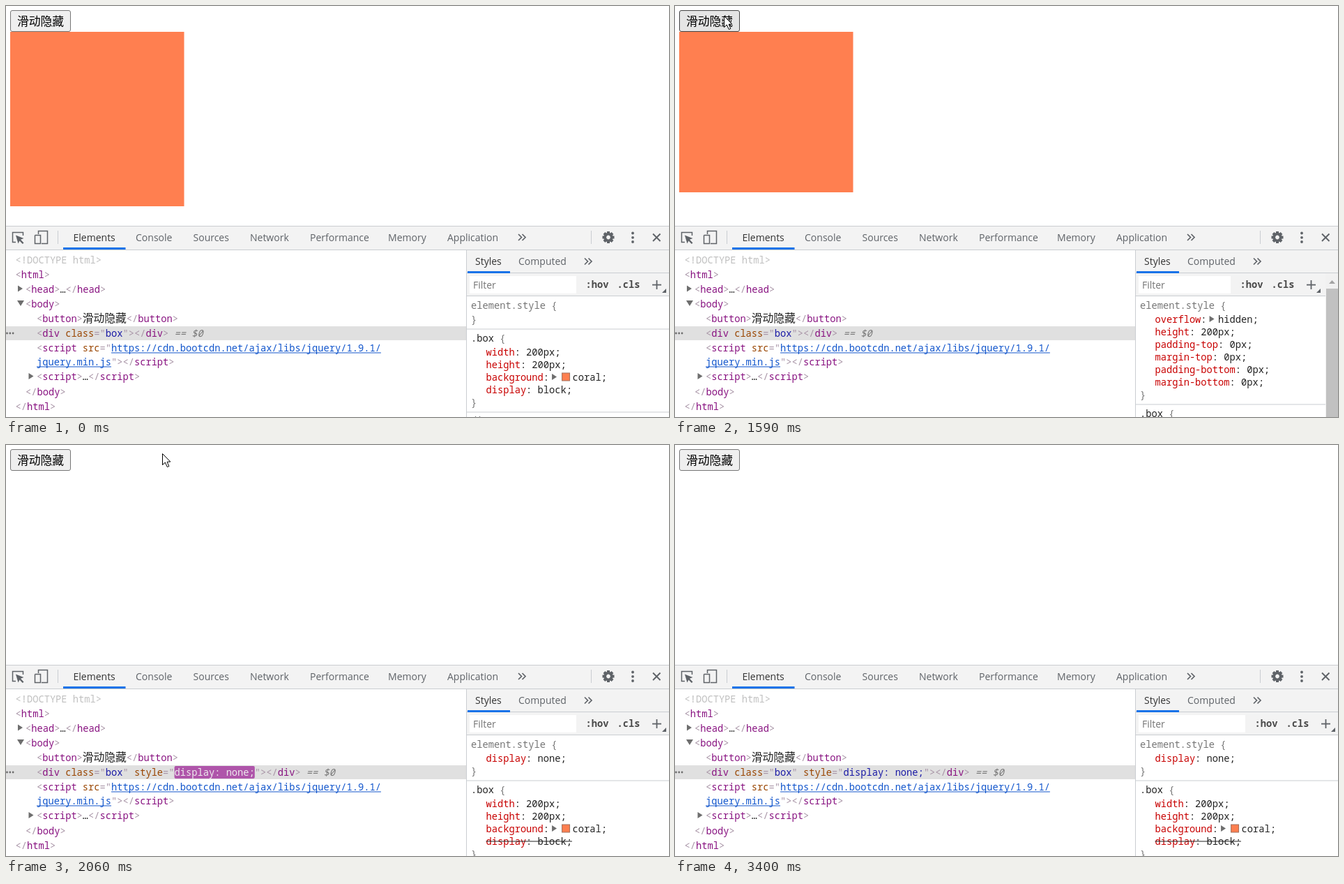
Recreate the animation shown at these times as an HTML page with a canvas. Size 951x589 px, loop 3.77 s.

```html
<!DOCTYPE html>
<html lang="zh">
<head>
<meta charset="utf-8">
<title>slideUp</title>
<style>
html, body { margin: 0; width: 100%; height: 100%; overflow: hidden; background: #fff; }
canvas { display: block; }
</style>
</head>
<body>
<canvas id="stage" width="951" height="589"></canvas>
<script>
const ctx = document.getElementById('stage').getContext('2d');
const LOOP = 3770;
const UI = '"Open Sans", "Noto Sans", sans-serif';
const MONO = '13.72px "Noto Sans Mono", "DejaVu Sans Mono", monospace';
const CJK = '"Noto Sans CJK SC", "Noto Sans CJK", sans-serif';
const BAR = '#f3f3f3', LINE = '#cacdd1', ICON = '#5f6368', BLUE = '#1a73e8', CORAL = '#ff7f50';

const TICKS = [0, 440, 520, 750, 830, 910, 980, 1440, 1510, 1590, 1670, 1750, 1830, 1910,
  2000, 2060, 2150, 2240, 2310, 2380, 2450, 2590, 2670, 2760, 2850, 2940, 3140, 3230, 3310, 3400];

// time, x, y of the pointer; no position means off stage
const POINTER = [[0], [440, 801, -15], [520], [750, 94, -8], [830, 80, 6], [910, 73, 13],
  [980, 70, 15], [2000, 150, 12], [2060, 224, 13], [2150]];

const SLIDE = { start: 1515, length: 414 };
const STYLED = 1590, CHANGED = 1715, HIDDEN = 1998, FLASH = 1400;

const INK = { p: '#a894a6', t: '#881280', a: '#994500', v: '#1a1aa6', l: '#1155cc',
  d: '#c0c0c0', k: '#222', c: '#222', e: '#757575', r: '#c80000', i: '#757575' };

function rect(x, y, w, h, color) {
  ctx.fillStyle = color;
  ctx.fillRect(x, y, w, h);
}

function text(str, x, y, font, color) {
  ctx.font = font;
  ctx.fillStyle = color;
  ctx.fillText(str, x, y);
  return x + ctx.measureText(str).width;
}

function poly(points, fill, stroke, width = 1) {
  ctx.beginPath();
  for (let i = 0; i < points.length; i += 2) ctx.lineTo(points[i], points[i + 1]);
  if (fill) {
    ctx.closePath();
    ctx.fillStyle = fill;
    ctx.fill();
  }
  if (stroke) {
    ctx.strokeStyle = stroke;
    ctx.lineWidth = width;
    ctx.stroke();
  }
}

function round(x, y, w, h, r, fill, stroke) {
  ctx.beginPath();
  ctx.roundRect(x, y, w, h, r);
  ctx.fillStyle = fill;
  ctx.fill();
  if (stroke) {
    ctx.strokeStyle = stroke;
    ctx.lineWidth = 1;
    ctx.stroke();
  }
}

// Each part starts with its ink key
function code(x, y, ...parts) {
  for (const part of parts) {
    const key = part[0], str = part.slice(1), from = x;
    const font = key === 'c' ? '15.75px ' + CJK : key === 'i' ? 'italic ' + MONO : MONO;
    x = text(str, x, y, font, INK[key]);
    if (key === 'l') rect(from, y + 1.5, x - from, 1, INK.l);
  }
  return x;
}

const right = (x, y) => poly([x, y - 4.5, x + 7, y, x, y + 4.5], '#6e6e6e');
const down = (x, y) => poly([x, y - 4, x + 10, y - 4, x + 5, y + 4], '#6e6e6e');

function more(x, y) {
  for (const dx of [0, 5.5]) poly([x + dx, y - 4.5, x + dx + 4.5, y, x + dx, y + 4.5], null, ICON, 1.7);
}

// cubic-bezier(0, 0, .2, 1)
function easeOut(x) {
  let lo = 0, hi = 1;
  for (let i = 0; i < 24; i++) {
    const s = (lo + hi) / 2;
    if (0.6 * s * s + 0.4 * s ** 3 < x) lo = s; else hi = s;
  }
  return 3 * lo * lo - 2 * lo ** 3;
}

const mix = (a, b, k) => `rgb(${a.map((v, i) => Math.round(v + (b[i] - v) * k)).join()})`;

// Highlight of a freshly changed attribute value
function flash(age) {
  const q = age / FLASH, mid = [168, 148, 166], soft = [245, 219, 244];
  if (q >= 1) return { back: 'transparent', ink: INK.v };
  if (q < 0.8) {
    const k = easeOut(q / 0.8);
    return { back: mix([158, 54, 153], soft, k), ink: mix([255, 255, 255], mid, k) };
  }
  const k = easeOut((q - 0.8) / 0.2);
  return { back: `rgba(${soft},${1 - k})`, ink: mix(mid, [26, 26, 166], k) };
}

function marked(str, x, y, look) {
  ctx.font = MONO;
  round(x, y - 14, ctx.measureText(str).width, 18, 2, look.back);
  return text(str, x, y, MONO, look.ink);
}

function drawPage(t, pos) {
  const over = pos.length > 1 && pos[1] >= 6 && pos[1] < 93 && pos[2] >= 6 && pos[2] < 37;
  const pressed = t >= 1440 && t < 1510;
  const face = pressed ? '#f5f5f5' : over ? '#e5e5e5' : '#efefef';
  const edge = pressed ? '#8d8d8d' : over ? '#444' : '#767676';
  round(6.5, 6.5, 86, 30, 2.5, face, edge);
  text('滑动隐藏', 16, 28, '16.8px ' + CJK, '#000');

  const p = Math.min(1, Math.max(0, (t - SLIDE.start) / SLIDE.length));
  const tall = Math.round(249.5 * (0.5 + Math.cos(Math.PI * p) / 2));
  rect(6, 37, 249.5, tall, CORAL);
}

function drawGear(x, y) {
  ctx.save();
  ctx.translate(x, y);
  for (let i = 0; i < 8; i++) {
    rect(-2, -8.5, 4, 5, ICON);
    ctx.rotate(Math.PI / 4);
  }
  ctx.beginPath();
  ctx.arc(0, 0, 4.8, 0, 7);
  ctx.strokeStyle = ICON;
  ctx.lineWidth = 3.8;
  ctx.stroke();
  ctx.restore();
}

function drawToolbar() {
  rect(0, 315, 951, 35, BAR);
  rect(0, 315, 951, 1, LINE);
  rect(0, 349, 951, 1, LINE);

  poly([14, 338.5, 9.5, 338.5, 9.5, 324.5, 24.5, 324.5, 24.5, 329], null, ICON, 1.5);
  poly([14, 328.5, 25.5, 333, 21, 334.8, 25.5, 339.5, 23.8, 341, 19.5, 336.5, 17.5, 340.5], ICON);
  poly([46.5, 327, 46.5, 322.5, 59.5, 322.5, 59.5, 340.5, 51, 340.5], null, ICON, 1.5);
  poly([41.5, 328.5, 49.5, 328.5, 49.5, 340.5, 41.5, 340.5, 41.5, 328.5], null, ICON, 1.5);
  rect(74, 322, 1, 19, LINE);
  rect(839, 322, 1, 19, LINE);

  const tabs = { Elements: 96.5, Console: 186, Sources: 268.5, Network: 350,
    Performance: 436, Memory: 548, Application: 633 };
  for (const name in tabs) text(name, tabs[name], 337, '14px ' + UI, name === 'Elements' ? '#333' : ICON);
  rect(82, 346, 89.5, 3, BLUE);
  more(735, 331.5);

  drawGear(864, 331.5);
  for (const y of [325.5, 331.8, 338]) {
    ctx.beginPath();
    ctx.arc(899, y, 1.9, 0, 7);
    ctx.fillStyle = ICON;
    ctx.fill();
  }
  poly([928, 326.5, 938.5, 337], null, ICON, 1.9);
  poly([938.5, 326.5, 928, 337], null, ICON, 1.9);
}

function drawTree(t) {
  const wrapped = t >= CHANGED && t < HIDDEN, drop = wrapped ? 20 : 0;
  ctx.save();
  ctx.beginPath();
  ctx.rect(0, 350, 660, 239);
  ctx.clip();

  rect(0, 459, 660, 20 + drop, '#e0e0e0');
  for (const x of [1.5, 5.8, 10.1]) {
    ctx.beginPath();
    ctx.arc(x, 469, 1.4, 0, 7);
    ctx.fillStyle = '#6e6e6e';
    ctx.fill();
  }

  code(13.5, 369, 'd<!DOCTYPE html>');
  code(13.5, 390, 'p<', 'thtml', 'p>');
  right(17, 405);
  code(28, 411, 'p<', 'thead', 'p>', 'k…', 'p</', 'thead', 'p>');
  down(16, 426);
  code(28, 432, 'p<', 'tbody', 'p>');
  code(44, 453, 'p<', 'tbutton', 'p>', 'c滑动隐藏', 'p</', 'tbutton', 'p>');

  let x = code(44, 474, 'p<', 'tdiv', 'p ', 'aclass', 'p="', 'vbox', 'p"'), y = 474;
  if (t >= CHANGED) {
    x = code(x, y, 'p ', 'astyle', 'p="');
    if (wrapped) {
      const look = flash(t - CHANGED);
      marked('overflow: hidden; height: 140.434px; padding-top: ', x, y, look);
      y += 20;
      x = marked('0px; margin-top: 0px; padding-bottom: 0px; margin-bottom: 0px;', 44, y, look);
    } else {
      x = marked('display: none;', x, y, flash(t - HIDDEN));
    }
    x = code(x, y, 'p"');
  }
  code(x, y, 'p></', 'tdiv', 'p>', 'i == $0');

  code(44, 495 + drop, 'p<', 'tscript', 'p ', 'asrc', 'p="', 'lhttps://cdn.bootcdn.net/ajax/libs/jquery/1.9.1/');
  code(44, 515 + drop, 'ljquery.min.js', 'p"></', 'tscript', 'p>');
  right(32.5, 530.5 + drop);
  code(44, 536 + drop, 'p<', 'tscript', 'p>', 'k…', 'p</', 'tscript', 'p>');
  code(28, 558 + drop, 'p</', 'tbody', 'p>');
  code(13.5, 579 + drop, 'p</', 'thtml', 'p>');
  ctx.restore();
}

// Draws one style rule and returns the baseline of the next
function drawRule(head, ink, props, y, struck) {
  code(667, y, ink + head, 'e {');
  y += 20;
  for (const [name, value] of props) {
    const colon = code(688.5, y, 'r' + name, 'k:');
    let x = colon + 8.2;
    if (name === 'overflow' || name === 'background') {
      right(colon + 4, y - 5);
      x = colon + 16.5;
    }
    if (name === 'background') {
      rect(x + 1.5, y - 11, 12, 12, '#a0705e');
      rect(x + 2.5, y - 10, 10, 10, CORAL);
      x += 17;
    }
    x = code(x, y, 'k' + value + ';');
    if (struck && name === 'display') rect(688.5, y - 5, x - 688.5, 1, '#222');
    y += 18;
  }
  code(667, y, 'e}');
  rect(661, y + 9, 290, 1, LINE);
  return y + 27;
}

function drawStyles(t) {
  const sliding = t >= STYLED && t < HIDDEN, hidden = t >= HIDDEN;
  const shift = sliding ? -21 : 0;

  rect(661, 350, 290, 66, BAR);
  rect(660, 350, 1, 239, LINE);
  rect(661, 382, 290, 1, LINE);
  rect(661, 415, 290, 1, LINE);
  text('Styles', 673, 371, '14px ' + UI, '#333');
  text('Computed', 735, 371, '14px ' + UI, ICON);
  rect(662, 380, 61, 3, BLUE);
  more(830, 366);

  rect(665, 387, 153 + shift, 25, '#fff');
  text('Filter', 670, 405, '14px ' + UI, '#757575');
  text(':hov', 831.5 + shift, 404, 'bold ' + MONO, '#4a4a4a');
  text('.cls', 876.5 + shift, 404, 'bold ' + MONO, '#4a4a4a');
  rect(927 + shift, 398.7, 13, 1.8, ICON);
  rect(932.6 + shift, 393, 1.8, 13, ICON);
  poly([947 + shift, 405, 947 + shift, 411, 941 + shift, 411], ICON);

  let own = [];
  if (hidden) own = [['display', 'none']];
  else if (sliding) own = [['overflow', 'hidden'], ['height', t < CHANGED ? '200px' : '140.434px'],
    ['padding-top', '0px'], ['margin-top', '0px'], ['padding-bottom', '0px'], ['margin-bottom', '0px']];
  const box = [['width', '200px'], ['height', '200px'], ['background', 'coral'], ['display', 'block']];
  let y = drawRule('element.style', 'e', own, 433.5, false);
  y = drawRule('.box', 'k', box, y, hidden);
  code(667, y - 1, 'ediv {');

  if (sliding) {
    rect(933, 383, 18, 206, '#f1f1f1');
    poly([938, 398, 942.5, 393, 947, 398], '#a3a3a3');
    rect(934, 405, 17, 184, '#c1c1c1');
  }
}

function drawPointer(pos) {
  if (pos.length < 2) return;
  ctx.save();
  ctx.translate(pos[1] + 0.5, pos[2] - 0.5);
  poly([0, 0, 0, 16, 3.8, 12.5, 6.8, 19, 9.3, 18, 6.6, 11.7, 11.3, 11.5, 0, 0], '#fff', '#000');
  ctx.restore();
}

function draw(t) {
  const pos = POINTER.findLast(p => p[0] <= t);
  rect(0, 0, 951, 589, '#fff');
  drawPage(t, pos);
  drawToolbar();
  drawTree(t);
  drawStyles(t);
  drawPointer(pos);
}

let began;
function frame(now) {
  began ??= now;
  const t = (now - began) % LOOP;
  draw(TICKS.findLast(tick => tick <= t));
  requestAnimationFrame(frame);
}
requestAnimationFrame(frame);
</script>
</body>
</html>
```
